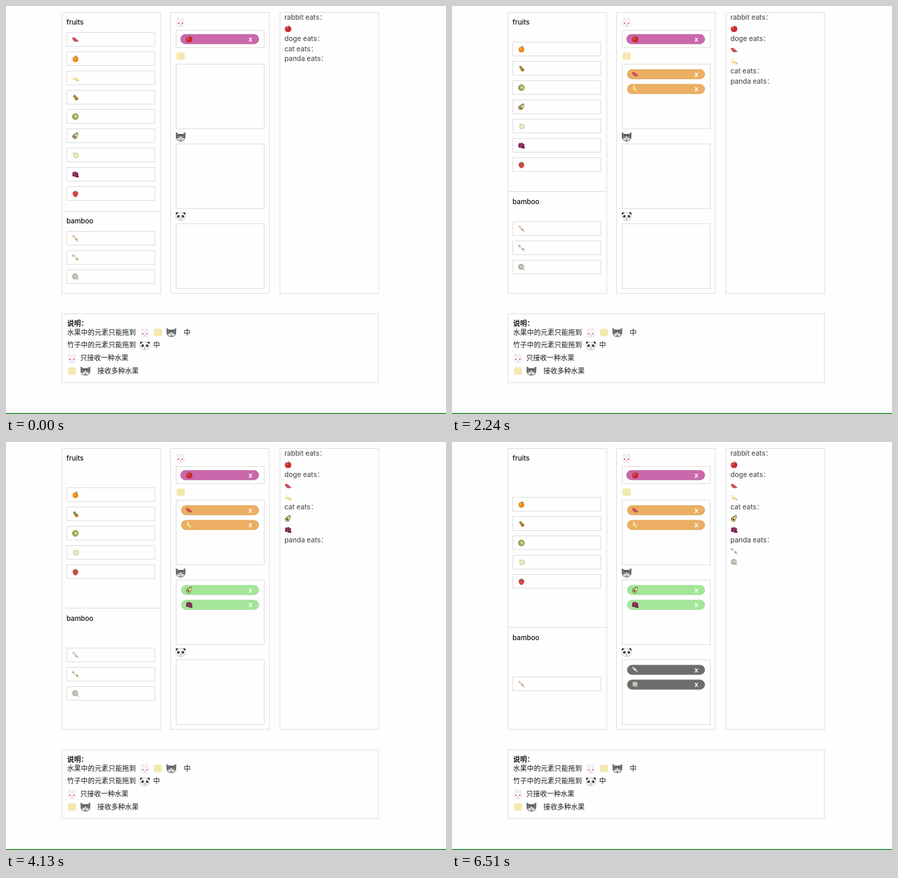
These frames come from a looping animation (640 by 593 pixels, 6580 ms). An HTML page:

```html
<!DOCTYPE html>
<html lang="zh-CN">
<head>
<meta charset="utf-8">
<style>
html, body { margin: 0; width: 100%; height: 100%; overflow: hidden; background: #fefefe; }
svg { display: block; width: 640px; height: 593px; font: 500 10px Inter, "Noto Sans CJK SC", sans-serif; }
.box { fill: none; stroke: #e0e0e0; }
.note { font-family: "Noto Sans CJK SC", "Noto Sans CJK", sans-serif; fill: #1a1a1a; }
.x { font-weight: 600; font-size: 10.5px; fill: #fff; }
</style>
</head>
<body>
<svg id="stage" viewBox="0 0 640 593">
<defs>
  <g id="apple">
    <path d="M0-2.6C3-4.4 5-2 4.6 1 4 4.3 2 5.4 0 4.6-2 5.4-4 4.3-4.6 1-5-2-3-4.4 0-2.6" fill="#c9282c"/>
    <ellipse cx="-1.8" cy="-.6" rx="1.2" ry="1.6" fill="#e8625a"/>
    <path d="M0-2.5L.3-4.8" stroke="#694020"/><path d="M.5-3.6Q1.5-5.5 3.4-5 2.6-3.3.5-3.6" fill="#6da33b"/>
  </g>
  <g id="watermelon">
    <path d="M-4.7-2.7L-1.6-3.2 4.9 2.2Q-3 5.4-4.7-2.7" fill="#e2485c"/>
    <path d="M-4.6-2.5Q-3 5 4.7 2.5" fill="none" stroke="#7d9468" stroke-width=".7"/>
    <path d="M-2.4-.8v.8M-.6.6v.8M1.4 1.5v.7" stroke="#7a2733" stroke-width=".6"/>
  </g>
  <g id="orange">
    <circle cy=".7" r="4.1" fill="#ea8a20"/><circle cx="-1.2" cy="-.2" r="1.3" fill="#f7b35a"/>
    <path d="M-.4-2.8Q.6-5 3.2-4.2 2.2-2.4-.4-2.8" fill="#5d7f36"/>
  </g>
  <g id="banana" fill="none" stroke-linecap="round">
    <path d="M-2.1-3.6Q-2.2 0 .4 1.6" stroke="#f6eecb" stroke-width="2"/>
    <path d="M-3.6.9Q-.6.9 0 2.4T4 3.5M-.2 1Q2.2.4 3.4 2" stroke="#ebd270" stroke-width="1.4"/>
    <path d="M4 3.6l.4.2" stroke="#8b7438"/>
  </g>
  <g id="pineapple" transform="rotate(-38)">
    <ellipse cy="1.9" rx="2.4" ry="3.2" fill="#c7962f"/>
    <path d="M-2 .5L1.8 4M-2 3L1.5-.6M-.8 5L2.3 1.6" stroke="#8f6420" stroke-width=".6"/>
    <path d="M-1.3-1L-2.2-4-.6-2.8 0-5.2.7-2.8 2.2-4 1.3-1Z" fill="#5d7d35"/>
  </g>
  <g id="kiwi">
    <circle r="4.7" fill="#857a45"/><circle cx=".5" cy="-.2" r="3.9" fill="#a3c35a"/>
    <circle cx=".5" cy="-.2" r="2.1" fill="none" stroke="#4a5b2c" stroke-width=".8" stroke-dasharray=".6 1"/>
    <circle cx=".5" cy="-.2" r="1.5" fill="#e9efc6"/>
  </g>
  <g id="avocado" transform="rotate(38)">
    <path d="M0-5.6C2-5.6 2-2 3-.2 4.2 2.3 3 4.8 0 4.8S-4.2 2.3-3-.2C-2-2-2-5.6 0-5.6" fill="#4b5630"/>
    <path d="M.3-4.8C1.7-4.6 1.5-1.4 2.5.2 3.5 2.2 2.3 4.2.2 4.2S-3 2.3-2 .2C-1-1.4-1-4.6.3-4.8" fill="#e8e093"/>
    <circle cx=".2" cy="1.7" r="1.6" fill="#80512b"/>
  </g>
  <g id="melon">
    <circle cx=".8" cy=".4" r="3.9" fill="#d9e2b4" stroke="#b6c48c" stroke-width=".6"/>
    <path d="M-2.4-2Q1 0 2.6 3.6M-2.8 1.6Q1 1.8 4 0M1-3Q2.8-.5 1 4" fill="none" stroke="#f4f6e0" stroke-width=".7"/>
    <path d="M-1.6-2.8L-3-4.2" stroke="#9aa777" stroke-width=".8"/>
  </g>
  <g id="grapes" fill="#842555">
    <path d="M-2.5-2.5L-3.6-4.4" stroke="#6e7a4c" stroke-width=".8"/>
    <circle cx="-2.7" cy="-1.4" r="1.8"/><circle cx=".1" cy="-2.4" r="1.8"/><circle cx="2.8" cy="-1" r="1.7"/>
    <circle cx="-2.8" cy="1.4" r="1.8" fill="#6d1b47"/><circle cx="0" cy=".4" r="1.9" fill="#9b3a6b"/>
    <circle cx="2.2" cy="1" r="1.7"/><circle cx=".6" cy="2.6" r="1.8"/><circle cx="3.3" cy="3" r="1.6" fill="#6d1b47"/>
  </g>
  <g id="strawberry">
    <path d="M0-3C3-4 4.4-1.8 3.9.8 3.3 3.6 1.6 5 0 5S-3.3 3.6-3.9.8C-4.4-1.8-3-4 0-3" fill="#cd3f3e"/>
    <path d="M-2-.6v.8M1.8-.6v.8M0 1v.8M-1.4 2.8v.7M1.5 2.8v.7" stroke="#f0b09a" stroke-width=".6"/>
    <path d="M-2.8-3L-.6-3.4 0-5.2.8-3.4 2.8-3 1-2 0-2.3-1-2Z" fill="#6a8243"/>
  </g>
  <g id="oden">
    <path d="M-4-4L4.8 4.8" stroke="#a88b66" stroke-width=".8"/>
    <path d="M-4.8-1.2L-3.6-4.6.2-3.4Z" fill="#dcb9b2"/>
    <circle cx="-.4" cy="-.5" r="2" fill="#e6d8be"/><rect x=".2" y=".3" width="2.7" height="2.7" rx=".6" transform="rotate(45 1.6 1.6)" fill="#bb9f7c"/>
  </g>
  <g id="dango">
    <path d="M-4-4L4.8 4.8" stroke="#a88b66" stroke-width=".8"/>
    <circle cx="-3" cy="-2.8" r="1.8" fill="#dcabb2"/><circle cx="-.4" cy="-.4" r="1.8" fill="#eee9dc"/>
    <circle cx="2.2" cy="1.9" r="1.8" fill="#a9b486"/>
  </g>
  <g id="lollipop">
    <path d="M2 2L4.6 4.8" stroke="#a3a39e"/>
    <circle cx="-.4" cy="-.6" r="3.8" fill="#dedacd" stroke="#8f9484" stroke-width=".9"/>
    <path d="M-.4-.6q1.2-1.4 1.6.4T-1 1.4-2.6-1.4 1-3" fill="none" stroke="#a98a86" stroke-width=".8"/>
  </g>
  <g id="rabbit">
    <path d="M-4.6.4C-5.4-3.4-4.6-6.4-3.2-6.2-1.8-6-1.2-3-1-1.6H.6C.6-4 1.4-6.4 2.8-6.2 4.4-6 4.6-2.6 4.2.2 7.4 2.6 6 6.8 0 6.8S-7.2 3-4.6.4" fill="#fdfafc" stroke="#e3dade" stroke-width=".8"/>
    <path d="M-3.1-4.6v2.8M2.7-4.6v2.8" stroke="#f5dde8"/>
    <circle cx="-2.9" cy="2" r="1.1" fill="#c34a88"/><circle cx="2.6" cy="2" r="1.1" fill="#c34a88"/>
    <path d="M-1 4.2L0 4.8 1 4.2" fill="none" stroke="#d86a9c" stroke-width=".8"/>
  </g>
  <rect id="doge" x="-6" y="-5.5" width="12" height="11" rx="3" fill="#f3e9b0"/>
  <g id="cat">
    <path d="M-7-6.4L-3-4H3L7-6.4 6.8 2Q5 6.8 0 6.8T-6.8 2Z" fill="#57585b"/>
    <path d="M0-2L1.4 1.2 6 2.4Q4 6 0 6T-6 2.4L-1.4 1.2Z" fill="#dededc"/>
    <path d="M-5.6-4.6L-5-2-3.4-3ZM5.6-4.6L5-2 3.4-3Z" fill="#b5adb0"/>
    <path d="M-4.8.1h2.6M2.2.1h2.6" stroke="#f4f4ee" stroke-width="1.5"/>
    <path d="M-3.5-.6v1.5M3.5-.6v1.5" stroke="#222"/>
    <path d="M-1 2.8H1L0 3.8ZM-1.6 4.8h3.2v.6h-3.2Z" fill="#3c3639"/>
  </g>
  <g id="panda">
    <circle cx="-5.2" cy="-3.8" r="2" fill="#2c2c2c"/><circle cx="5.2" cy="-3.8" r="2" fill="#2c2c2c"/>
    <ellipse cy=".5" rx="7" ry="5.8" fill="#fbfbfa" stroke="#b0b0b0" stroke-width=".7"/>
    <ellipse cx="-3.2" cy=".2" rx="2" ry="1.7" transform="rotate(-30 -3.2 .2)" fill="#1c1c1c"/>
    <ellipse cx="3.2" cy=".2" rx="2" ry="1.7" transform="rotate(30 3.2 .2)" fill="#1c1c1c"/>
    <circle cx="-2.9" r=".6" fill="#fff"/><circle cx="2.9" r=".6" fill="#fff"/>
    <path d="M-1 2.6H1L0 3.6Z" fill="#222"/><path d="M-1.4 4.6h2.8" stroke="#c78d92" stroke-width=".8"/>
  </g>
</defs>
<g id="fixed"></g>
<g id="live"></g>
</svg>
<script>
const LOOP = 6580;
const fruits = ['watermelon', 'orange', 'banana', 'pineapple', 'kiwi', 'avocado', 'melon', 'grapes', 'strawberry'];
const sticks = ['oden', 'dango', 'lollipop'];
const eaters = [
  { name: 'rabbit', iconY: 23, top: 35, height: 25, pad: 6, left: 254, color: '#cb67ab', edge: '#b56098' },
  { name: 'doge', iconY: 73, top: 84, height: 94, pad: 8, left: 255, color: '#ecae62', edge: '#dda864' },
  { name: 'cat', iconY: 190, top: 200, height: 94, pad: 8, left: 255, color: '#a3e697', edge: '#a5dc9c' },
  { name: 'panda', iconY: 305.5, top: 316, height: 94, pad: 8, left: 255, color: '#6d6d6d', edge: '#787878' }
];
// Each drop: time, food, eater
const drops = [
  [630, 'watermelon', 'doge'], [1820, 'banana', 'doge'], [3080, 'avocado', 'cat'],
  [3920, 'grapes', 'cat'], [4970, 'dango', 'panda'], [6020, 'lollipop', 'panda']
];

const icon = (name, x, y) => `<use href="#${name}" x="${x}" y="${y}"/>`;
const box = (x, y, w, h) => `<rect class="box" x="${x + .5}" y="${y + .5}" width="${w}" height="${h}"/>`;
const text = (s, x, y, fill) => `<text x="${x}" y="${y + 3.6}" fill="${fill}">${s}</text>`;
const note = (s, x, y) => `<text class="note" x="${x}" y="${y + 3.7}">${s}</text>`;

function fixedParts() {
  return [81, 239, 398].map(x => box(x, 9, 143.5, 408.3)).join('') +
    eaters.map(e => icon(e.name, 254, e.iconY) + box(247, e.top, 128, e.height)).join('') +
    text('fruits', 88, 23.5, '#111') +
    box(81, 447, 460, 100) +
    `<g font-weight="700">${note('说明：', 89, 461)}</g>` +
    note('水果中的元素只能拖到', 89, 474) + note('中', 258.5, 474) +
    icon('rabbit', 202, 474.5) + icon('doge', 221, 474.5) + icon('cat', 240.5, 474.5) +
    note('竹子中的元素只能拖到', 89, 492.5) + icon('panda', 202, 493.5) + note('中', 214, 492.5) +
    icon('rabbit', 96, 511.5) + note('只接收一种水果', 108, 511) +
    icon('doge', 96, 530.5) + icon('cat', 115.5, 530.5) + note('接收多种水果', 133, 530) +
    '<rect y="591.7" width="640" height="1.3" fill="#0f7d14"/>';
}

function list(items, y) {
  return items.map((name, i) => {
    const top = Math.round(y + i * 28);
    return box(88, top, 128, 20) + icon(name, 101, top + 10.7);
  }).join('');
}

function pill(e, name, i) {
  const top = e.top + e.pad + i * 21.5;
  return `<rect x="${e.left}" y="${top + .3}" width="${367.6 - e.left}" height="13.7" rx="6.9" fill="${e.color}" stroke="${e.edge}" stroke-width=".8"/>` +
    icon(name, 266.5, top + 7) + `<text class="x" x="352.5" y="${top + 10.7}">x</text>`;
}

function liveParts(count) {
  const done = drops.slice(0, count);
  const taken = done.map(d => d[1]);
  const rest = items => items.filter(n => !taken.includes(n));
  const gone = items => items.length - rest(items).length;
  const split = 298 - 14.1 * (gone(fruits) - gone(sticks));
  const line = Math.round(split - .5) + .5;
  let out = list(rest(fruits), 38 + 7 * count) +
    `<path class="box" d="M81 ${line}H225"/>` + text('bamboo', 88, split + 14.3, '#111') +
    list(rest(sticks), split + 29 + 7 * count);
  let y = 9.3;
  for (const e of eaters) {
    const eaten = done.filter(d => d[2] == e.name).map(d => d[1]);
    if (e.name == 'rabbit') eaten.push('apple');
    out += text(e.name + ' eats：', 405, y + 7.2, '#555');
    y += 14.5;
    eaten.forEach((name, i) => {
      out += pill(e, name, i) + icon(name, 410.3, y + 9.2);
      y += 16.4;
    });
  }
  return out;
}

const get = id => document.getElementById(id);
let shown = -1;
function draw() {
  const t = performance.now() % LOOP;
  const count = drops.filter(d => t >= d[0]).length;
  if (count != shown) get('live').innerHTML = liveParts(shown = count);
  requestAnimationFrame(draw);
}
get('fixed').innerHTML = fixedParts();
draw();
</script>
</body>
</html>
```
